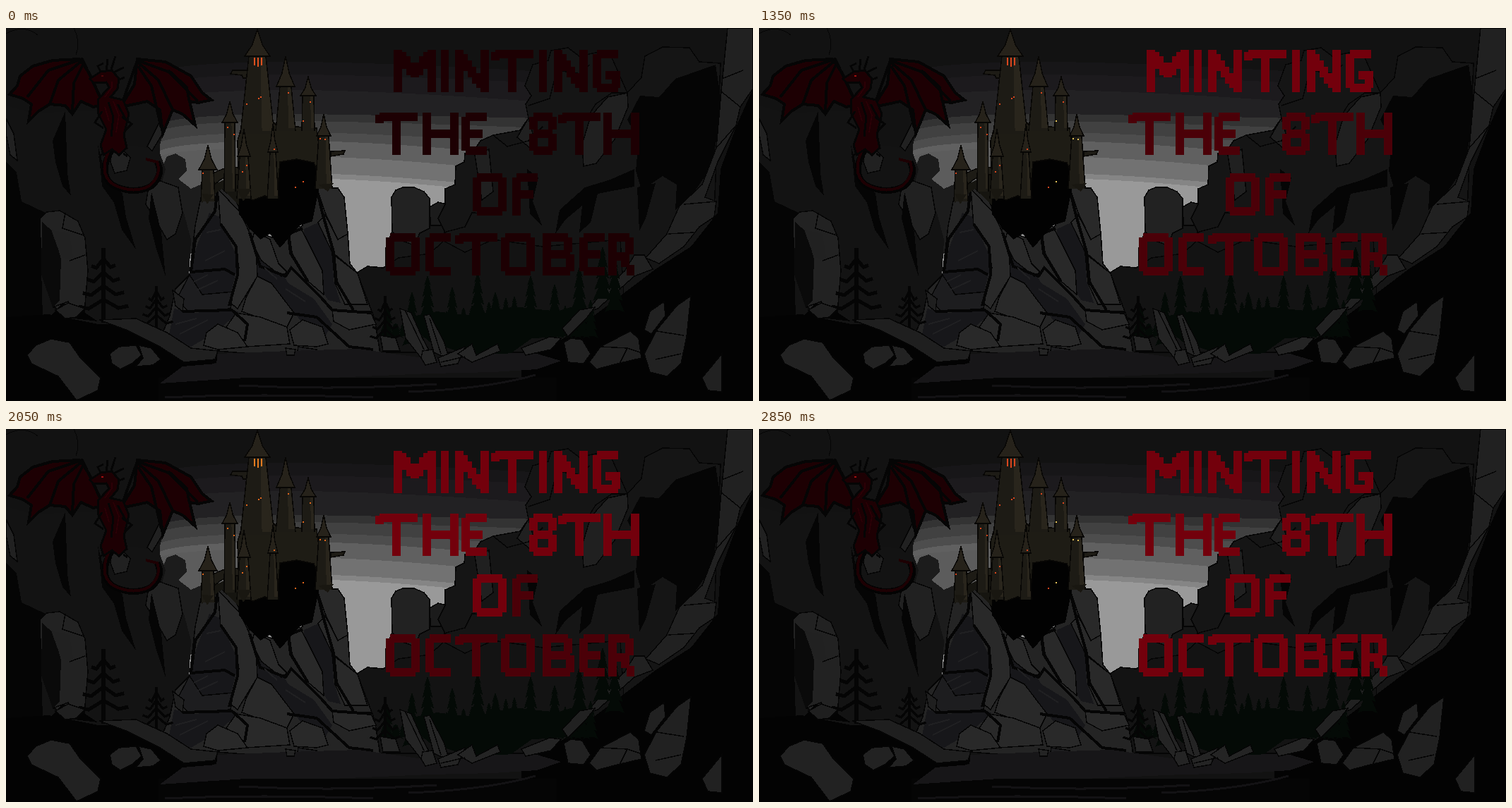
Recreate the animation shown at these times as an HTML page. Size 1058 by 529 pixels, loop 2.95 s.

```html
<!DOCTYPE html>
<html lang="en">
<head>
<meta charset="utf-8">
<title>Minting the 8th of October</title>
<style>
html, body { margin: 0; width: 100%; height: 100%; overflow: hidden; background: #121212; }
svg { display: block; width: 100%; height: 100%; shape-rendering: crispEdges; }
</style>
</head>
<body>
<svg id="stage" viewBox="0 0 1058 529" preserveAspectRatio="none"></svg>
<script>
const stage = document.getElementById('stage');
const parts = [];
const INK = '#050505', ROCK = '#212121', CLIFF = '#131313', STONE = '#292929', BLOOD = '#1d0003';

const path = (d, fill, stroke = 'none', width = 1.5) =>
  parts.push(`<path d="${d}" fill="${fill}" stroke="${stroke}" stroke-width="${width}"/>`);
const fills = (color, ...ds) => ds.forEach(d => path(d + 'Z', color));
const rocks = (color, ...ds) => ds.forEach(d => path(d + 'Z', color, INK));
const lines = (color, width, ...ds) => ds.forEach(d => path(d, 'none', color, width));

function sky() {
  // Each band: left height, right height, shade
  [[48, 62, '#171618'], [66, 78, '#1c1a1d'], [88, 105, '#222123'], [122, 128, '#333'],
   [132, 142, '#414141'], [148, 166, '#4d4d4d'], [160, 184, '#606060'], [182, 208, '#727272'],
   [206, 232, '#858585'], [213, 240, '#999']]
    .forEach(([left, right, shade]) =>
      fills(shade, `M218 ${left + 14}Q250 ${left} 420 ${left}Q560 ${left + 2} 760 ${right}V370H218`));
  fills('#5c5c5c', 'M218 182Q240 172 330 172V250H218');
  lines(INK, 1, 'M96 0Q106 20 99 38M0 8Q25 -6 45 10');
}

function leftCliff() {
  fills('#1c1c1c', 'M222 196L228 182L240 178L254 186L256 202L244 214L262 228L276 222L300 232V320H210V220');
  fills(CLIFF, 'M0 110L40 122L85 118H130L155 165L200 170L222 125L224 145L216 172L226 200L218 230L252 262L262 300L255 425H0');
  rocks(ROCK, 'M0 128L11 150L16 188L6 180L0 150', 'M200 168L221 126L223 148L207 174',
    'M150 174L166 173L176 184L171 202L154 206L148 190',
    'M202 225L216 216L244 226L250 262L240 292L228 300L214 276L198 250');
  fills(INK, 'M66 160L84 118L87 206L92 238L80 224L70 190', 'M0 190L15 205L22 246L56 262L48 272L52 410H0',
    'M130 165L140 205L165 235L170 268L184 314L164 286L153 248L136 224',
    'M206 232L220 290L226 352L212 310L202 270');
  rocks('#222', 'M48 270L58 261L76 259L102 274L112 298L116 344L111 404L94 410L68 396L50 340');
  fills('#0a0a0a', 'M51 275L68 290L78 328L76 386L66 396L50 350');
  fills(ROCK, 'M64 286L90 292L96 330L78 325');
  lines(INK, 1.5, 'M84 262L80 284L110 294M90 330L112 322M66 396L88 388L96 400');
}

function rightCliff() {
  rocks('#1b1b1b', 'M600 254L612 247L624 250L630 230L646 228L650 330H596L602 290');
  rocks('#161616', 'M549 284L544 296L538 312V350H660V280H600');
  rocks('#222', 'M546 240L552 230L562 226H578L592 232L600 242V284L586 291L578 308L556 300L547 288');
  rocks('#151515', 'M622 290L612 270L622 250L622 228L636 222L637 196L649 190L650 178L664 172L672 160L690 152L728 145L740 128L736 108L744 96L735 82L746 52L768 46L772 32L796 28L812 40L840 34L858 42L880 92L900 70L905 40L930 27L968 28L982 48L1012 50L1000 330L860 400L620 400');
  rocks(CLIFF, 'M492 350L512 338L534 340L556 326L600 320L620 302L650 318L690 300L760 310L870 300L880 460H500');
  rocks('#202020', 'M816 165L828 125L852 98L880 92L881 112L862 158L836 192L818 196',
    'M664 180L684 172L690 232L674 244', 'M724 155L740 128L746 150L742 170');
  lines(INK, 1.5, 'M740 110L770 100L780 60L815 65L826 52M880 92L858 92L835 108L820 132M690 152L710 168L740 160L760 140M620 290L650 282L660 262L700 264');
  fills(INK, 'M880 130L898 96L925 98L948 72L1005 52L1014 110L1000 196L975 232L948 258L950 222L930 210L900 230L892 202L896 160',
    'M856 215L890 200L890 225L838 235L828 276L812 290L816 252L792 272L778 292L784 258L820 226',
    'M738 200L754 212L746 246L760 282L742 264', 'M894 226L920 220L906 270L897 288');
  rocks(ROCK, 'M1022 0H1058V86L1040 112L1034 138L1008 190L990 240L1006 246L1003 268L982 282L960 310L925 334L906 326L936 292L954 252L986 222L1006 170L1013 90',
    'M904 322L890 322L876 345L848 372L820 404L838 398L890 352L916 342');
  fills('#030303', 'M1058 86L1034 140L1012 200L1008 262L970 310L920 342L846 398L790 440L730 470V529H1058');
  lines(INK, 1.5, 'M1006 170L1034 138M960 250L1006 246M938 292L974 290M1014 72L1044 60M1013 90L1040 112');
}

function pine(x, top, base, reach, color) {
  let left = '', right = '';
  const tiers = 5, step = (base - top) / tiers;
  for (let i = 1; i <= tiers; i++) {
    const w = reach * (0.2 + 0.8 * i / tiers), y = top + i * step;
    right += `L${x + w} ${y}L${x + w * .5} ${y - 3}`;
    left = `L${x - w * .5} ${y - 3}L${x - w} ${y}` + left;
  }
  fills(color, `M${x} ${top}${right}${left}`);
}

function forest() {
  const green = '#040a06';
  for (let i = 0; i < 25; i++) {
    const x = 540 + i * 12;
    pine(x, 390 + (i * 29 % 31) - i * .8, 440, 11, green);
  }
  [[575, 373], [597, 350], [632, 366], [668, 346], [693, 373], [743, 350], [777, 362],
   [812, 338], [845, 309], [862, 325]].forEach(([x, y]) => pine(x, y, y + 78, 14, green));
  fills(green, 'M560 412L610 402L660 408L720 395L780 402L820 390L790 438L745 440L710 465L650 462L600 445');
}

// Straggly tree: trunk with drooping branches
function bareTree(x, top, base, reach) {
  let d = `M${x} ${top}V${base}`;
  for (let i = 1; i < 5; i++) {
    const y = top + (base - top) * i / 5.5, w = reach * (.3 + i * .17);
    d += `M${x - w} ${y + 6}L${x - w * .6} ${y + 9}L${x} ${y - 4}L${x + w * .6} ${y + 8}L${x + w} ${y + 5}`;
  }
  lines(INK, reach / 7, d);
}

function tower(x, apex, eave, roof, body, base, flare = 3) {
  path(`M${x - body - flare} ${base}L${x - body} ${eave}H${x + body}L${x + body + flare} ${base}`, '#1d1b15', '#080705');
  fills('#29251c', `M${x + body * .35} ${eave}H${x + body - 1}L${x + body + flare - 1} ${base - 4}H${x + body * .55}`);
  path(`M${x} ${apex}L${x + roof * .4} ${(apex + eave) / 2 + 3}L${x + roof} ${eave}H${x - roof}L${x - roof * .4} ${(apex + eave) / 2 + 3}Z`, '#26221a', '#080705');
}

function crag() {
  rocks('#242424', 'M300 222L326 246L345 285L385 300L420 280L440 226L470 227L479 240L484 290L487 334L498 348L512 386L522 412L530 462L420 468L300 458L240 452L222 432L232 408L240 370L260 350L268 280L275 246');
  fills('#17171a', 'M288 262L308 270L316 300L330 330L318 378L262 376L260 350L270 310',
    'M336 290L352 306L388 342L400 362L436 384L462 420L446 448L408 404L372 366L346 392L342 340',
    'M422 285L442 276L462 318L464 358L474 390L456 386L424 330',
    'M238 398L270 404L300 398L330 402L300 430L262 452L230 440');
  rocks(STONE, 'M300 228L332 262L354 310L356 352L328 398L318 390L330 340L324 308L304 280',
    'M440 226L470 227L479 240L484 292L470 300L452 262', 'M452 265L470 300L484 292L487 334L498 348L462 318L442 276',
    'M462 320L498 348L512 392L480 392L466 362', 'M398 290L414 278L424 296L448 344L450 378L424 356L402 320',
    'M352 288L374 300L386 334L398 346L390 352L362 330L348 304',
    'M356 352L376 362L408 404L398 424L356 410L334 402L340 382',
    'M462 400L516 402L524 420L486 428L464 416', 'M402 428L420 414L448 424L456 448L440 452L408 450',
    'M360 410L398 424L402 448L340 452L312 424L326 404', 'M284 432L300 420L328 432L342 452L300 456L280 450');
  rocks('#1d1d1f', 'M260 350L278 378L322 374L318 398L258 402L242 384', 'M414 452L440 456L436 468L412 464');
  lines(INK, 4, 'M300 225L296 260L268 300L262 346L310 342L324 350', 'M304 278L326 310L328 350L316 394',
    'M345 290L360 338L396 352L404 340L446 382L462 400L518 404', 'M440 228L448 262L464 318L468 360L492 400',
    'M420 284L400 292L404 320L428 360', 'M398 404L440 410L486 452L520 456', 'M250 402L320 400L342 420L338 444');
  lines('#202022', 2, 'M266 360L286 350M270 372L300 358M282 330L310 316M284 290L304 286M240 420L270 412M246 434L286 414M396 370L424 388M366 340L384 356');
}

function castle() {
  fills('#020202', 'M326 232L345 238L380 235L384 188L414 184L442 190L443 228L434 274L416 280L388 312L374 292L360 300L346 286L330 264');
  path('M345 100L383 138L440 142L446 190L440 200L436 191L412 186L388 190L384 240L366 238L350 244L330 235L328 160Z', '#1e1c15', '#080705');
  fills('#161510', 'M277 235L294 222L330 206V252L306 228L277 248');
  path('M294 206Q310 196 330 198V208Q310 206 294 224Z', '#1d1b15', '#080705');
  path('M342 60L321 60L318 65L334 67L336 71H344ZM460 175L480 174L478 179L460 182Z', '#1d1b15', '#080705');
  tower(356, 2, 40, 18, 12, 150, 12);
  tower(396, 40, 83, 13, 8, 146, 6);
  tower(428, 69, 96, 11, 8, 146, 1);
  tower(450, 122, 153, 10, 7, 228, 5);
  tower(317, 104, 134, 11, 7, 232, 1);
  tower(337, 143, 182, 9, 6, 242, 4);
  tower(378, 136, 176, 7, 4, 242, 4);
  tower(286, 166, 201, 13, 8, 246, 2);
  fills('#191711', 'M277 235L285 250L294 236', 'M326 228L336 246L348 228', 'M442 222L456 232L464 220');
}

function foreground() {
  bareTree(138, 312, 418, 36);
  bareTree(213, 366, 428, 24);
  bareTree(537, 380, 450, 22);
  fills('#030303', 'M0 410L60 406L130 420L200 422L232 446L298 462L300 474L222 500L216 529H0',
    'M64 408L80 390L100 396L130 416');
  rocks('#1f1f1f', 'M132 414L184 412L228 432L262 454L300 458L296 470L252 474L218 452L170 428',
    'M236 372L252 384L250 402L240 394', 'M70 400L88 390L112 398L100 410L84 412');
  rocks('#222', 'M42 450L64 441L90 446L104 466L134 496L130 514L100 528L74 494L36 476L30 464',
    'M147 462L160 452L184 450L192 464L178 476L162 484L150 476',
    'M188 450L206 454L219 470L208 478L184 480L194 468');
  fills('#050505', 'M216 496H780V529H216');
  fills('#171618', 'M300 462L400 458L500 455L590 468L700 462L745 460L786 472L752 484L690 488L600 490L460 496L340 496L218 504L250 480L298 476');
  lines('#131214', 3, 'M225 524Q360 518 520 524M330 507Q470 514 610 505M570 516Q680 512 750 492');
  rocks('#242424', 'M558 398L574 404L590 440L606 470L588 468L566 440', 'M592 408L600 406L620 444L628 470L606 460',
    'M530 436L552 440L558 458L534 458', 'M590 458L604 456L610 474L594 478L588 468',
    'M612 468L650 452L640 476L616 480', 'M640 462L660 448L666 464L696 448L700 458L660 474',
    'M730 454L770 438L786 440L772 456L736 464', 'M396 454L410 456L408 464L398 464');
  lines(INK, 1.5, 'M566 402L592 456M600 412L616 462M616 474L650 466');
  rocks(ROCK, 'M790 446L800 440L816 442L828 462L818 476L796 474',
    'M826 474L842 452L884 430L896 440L900 468L866 476L836 484', 'M912 402L932 388L934 408L914 434L904 428',
    'M904 462L922 428L950 394L970 380L964 438L956 476L936 494L912 488', 'M986 496L1014 462L1014 516L994 514',
    'M788 426L812 400L834 396L820 414L796 438');
  lines(INK, 1.5, 'M842 452L880 454L898 460M880 454L870 474M922 430L960 436M920 470L956 462');
}

function dragon() {
  lines('#030303', 9, 'M150 172Q130 205 150 222Q180 238 206 224Q224 208 214 190');
  lines(BLOOD, 4, 'M150 165Q128 205 152 222Q180 236 203 224Q221 208 214 190L198 186');
  path('M138 108L118 64L104 44L66 46L38 54L20 68L16 82L5 94L24 100L36 108L32 132L46 118L62 108L84 110L94 122L106 104L124 112Z', BLOOD, INK, 4);
  path('M162 112L182 80L186 44L226 48L262 68L278 92L291 102L272 106L260 104L268 138L250 122L236 116L222 150L218 116L200 104L182 108Z', BLOOD, INK, 4);
  lines(INK, 4, 'M136 104L108 44L60 60L30 98M108 46L74 74L62 108M110 50L96 78L94 118',
    'M164 108L186 46L230 62L272 104M186 48L216 74L236 116M187 54L206 82L220 142M230 60L256 84L260 106');
  path('M119 72L134 62L150 60L160 72L158 86L148 98L166 102L174 122L167 152L171 170L160 180L150 172L138 180L134 166L142 144L130 120L130 102L146 84L142 77L124 78Z', BLOOD, INK, 3);
  lines(INK, 3, 'M134 62L130 54L138 50M142 62L144 44M148 62L155 40M152 63L167 56M158 74L168 70M145 105L152 126L149 154M158 108L170 130M136 118L126 134L138 142M164 126L178 136L168 146M136 178L132 184M166 178L172 182');
  lines('#2c0006', 1.5, 'M152 104L160 124L156 148M140 112L146 132M150 76L150 84L140 98');
  parts.push('<path id="eye" d="M135 67h3v2h-3z"/>');
}

const glyphs = {
  M: 'M1 0V10M9 0V10M2 .5v2.5M3 1.5v3M4 3v3M5 4v2.5M6 3v3M7 1.5v3M8 .5v2.5',
  I: 'M1.2 0V10',
  N: 'M1 0V10M7 0V10M2 1v2.5M3 2.5v2.5M4 4v2.5M5 5.5v2.5M6 7v2',
  T: 'M1 1H10M0 1.5H2M5 0V10',
  G: 'M1 1H6M1 1V9M1 9H6M3 6H6.5M5.5 5V9',
  H: 'M1 0V10M7.5 0V10M2 5H7',
  E: 'M1 1V9M1 1H6M1 5H5M1 9H6',
  8: 'M1 1H5.5M1 1V4M5.5 1V4M1 5H5.5M1 5V9M5.5 5V9M1 9H5.5',
  O: 'M1 1V9M7 1V9M1 1H7M1 9H7',
  F: 'M1 1V10M1 1H6M1 5H5',
  C: 'M1 1V9M1 1H6M1 9H6',
  B: 'M1 0V10M2 1H6M6 1V4.5M2 5H6.5M6.5 5V9M2 9H6.5',
  R: 'M1 0V10M2 1H5M5 1V5M2 5.5H5M4 6V8M5.2 7.5V10'
};
const rows = [
  ['MINTING', 31, [549, 614, 636, 687, 753, 776, 831]],
  ['THE8TH', 120, [523, 590, 645, 741, 782, 846]],
  ['OF', 206, [661, 717]],
  ['OCTOBER', 291, [538, 594, 636, 701, 760, 812, 853]]
];
const lamps = [[341, 108], [358, 100], [361, 98], [400, 92], [431, 105], [421, 132], [314, 141], [323, 151],
  [445, 157], [452, 158], [341, 195], [335, 204], [380, 172], [279, 206], [410, 226], [421, 218]];

sky();
leftCliff();
rightCliff();
forest();
crag();
castle();
foreground();
dragon();
parts.push('<g id="lights"><path d="M351 42h2v11h-2zM356 42h2v13h-2zM361 42h2v11h-2z"/>',
  ...lamps.map(([x, y]) => `<path d="M${x - 1} ${y - 1}h2v2h-2z"/>`), '</g>');
parts.push('<g id="title" role="img" aria-label="Minting the 8th of October" fill="none" stroke-width="1.85">');
for (const [word, y, xs] of rows)
  xs.forEach((x, i) => parts.push(`<path transform="translate(${x} ${y}) scale(6)" d="${glyphs[word[i]]}"/>`));
parts.push('</g>');
stage.innerHTML = parts.join('');

const letters = [...document.querySelectorAll('#title path')];
const lights = [...document.querySelectorAll('#lights path')];
const eye = document.getElementById('eye');
const yellowLamps = [6, 9, 10, 16];

function lightColor(i, step) {
  if (step === 0) return '#e0501e';
  if (step % 3 === 2) return yellowLamps.includes(i) ? '#e6c45a' : '#d9461e';
  if (i > 0) return '#e0661c';
  return step % 3 ? '#ee9626' : '#e67c20';
}

let shown = -1;
function draw(now) {
  const t = now % 2950;
  const step = t < 500 ? 0 : t < 750 ? 1 : 2 + Math.floor((t - 750) / 100);
  if (step !== shown) {
    shown = step;
    letters.forEach((el, i) => el.setAttribute('stroke', step === 0 ? '#1d0003' : i < step - 1 ? '#73000c' : '#4b0008'));
    lights.forEach((el, i) => el.setAttribute('fill', lightColor(i, step)));
    eye.setAttribute('fill', step ? '#a01010' : '#4a0808');
  }
  requestAnimationFrame(draw);
}
draw(performance.now());
</script>
</body>
</html>
```
